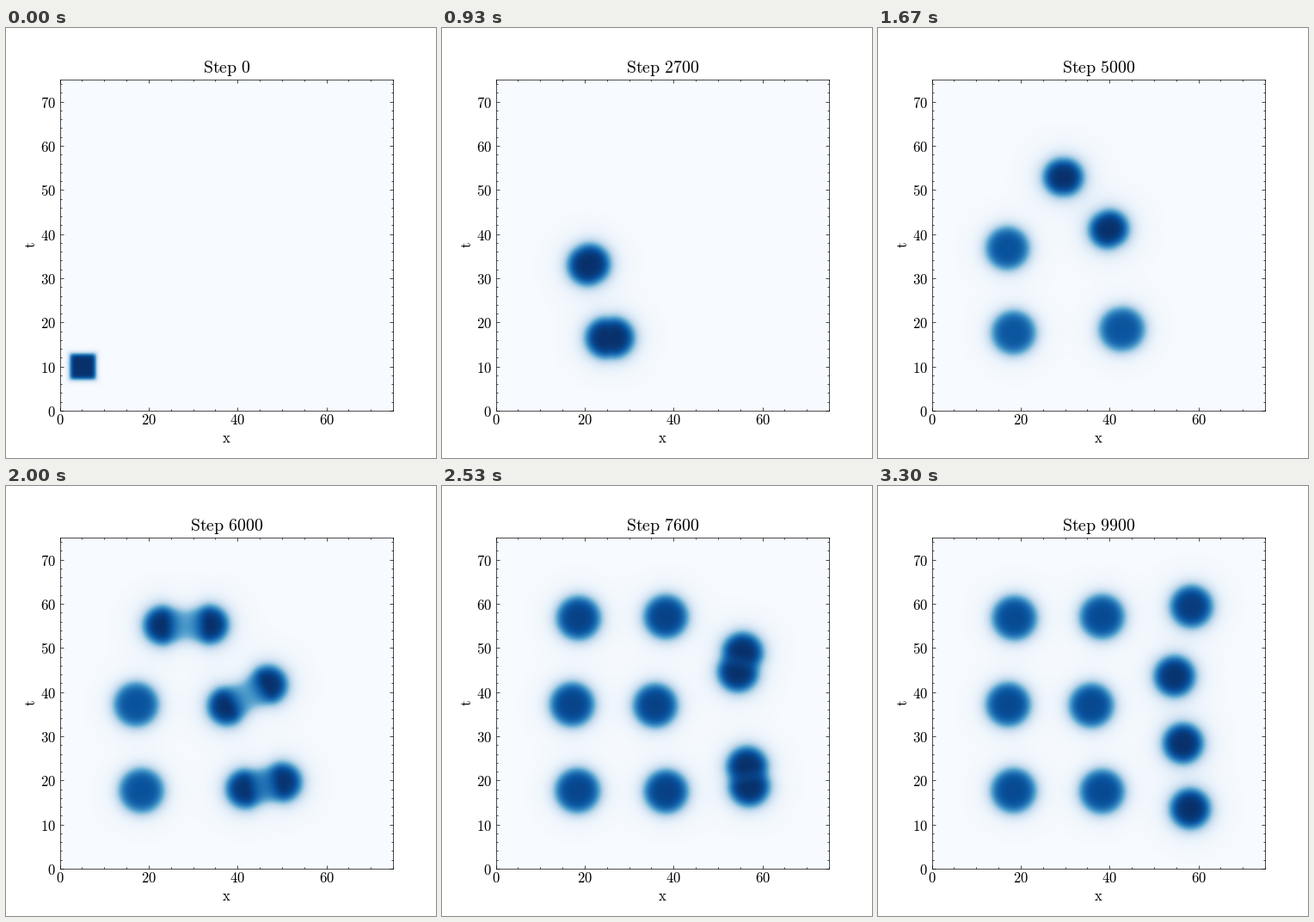
A matplotlib script that plays this animation: 500x500 px, repeating every 3.33 s.

```python
import numpy as np
import matplotlib.pyplot as plt
from matplotlib.animation import FuncAnimation
from matplotlib.ticker import FuncFormatter, MultipleLocator

SIZE = 75
FRAMES = 100
STEPS_PER_FRAME = 100
REACH = 7.8      # half length of a spot at the moment it divides
SETTLE = 1850    # steps a spot needs to come to rest

plt.rcParams["mathtext.fontset"] = "cm"

axis = (np.arange(225) + 0.5) * SIZE / 225
GRID = axis[None, :] + 1j * axis[:, None]

# Family tree, points as x + yj: a spot rests at a point, or divides there
# at a given step into two further spots.
upper_right = (55.9 + 47.5j, 8200, (58.3 + 59.4j,), (54.5 + 43.6j,))
lower_right = (57.2 + 21j, 8200, (56.4 + 28.4j,), (58 + 13.6j,))
top = (28.2 + 55.4j, 6250, (38.2 + 57.1j,), (18.5 + 56.8j,))
middle = (42.3 + 39.1j, 6250, upper_right, (35.8 + 37j,))
bottom = (46.2 + 18.9j, 6350, lower_right, (38.2 + 17.5j,))
inner = (34.6 + 47j, 5000, top, middle)
upper = (22.2 + 36.9j, 4000, inner, (17.1 + 37.2j,))
lower = (27.4 + 17.2j, 3600, bottom, (18.3 + 17.7j,))
root = (22.1 + 23.5j, 2300, upper, lower)


def grow(node, birth, start):
    """Flatten the tree; daughters begin at the tips of their parent."""
    home, *fate = node
    cell = dict(birth=birth, start=start, home=home, end=np.inf, axis=1)
    if not fate:
        return [cell]
    end, a, b = fate
    direction = (a[0] - b[0]) / abs(a[0] - b[0])
    cell.update(end=end, axis=direction)
    tip = REACH * direction
    return [cell] + grow(a, end, home + tip) + grow(b, end, home - tip)


cells = grow(root, 0, 5.1 + 10j)


def mix(a, b, k):
    return a + (b - a) * k


def position(cell, step):
    age = step - cell["birth"]
    if np.isinf(cell["end"]):
        ease = 1 - (1 - min(age / SETTLE, 1)) ** 3
    else:
        ease = 1 - (1 - age / (cell["end"] - cell["birth"])) ** 1.6
    return mix(cell["start"], cell["home"], ease)


def spot(cell, pos, nearest, step):
    """A capsule that stretches, thins at the waist and parts."""
    grown = min(step / 300, 1)
    stretch = np.exp(-((cell["end"] - step) / 500) ** 1.3)
    half = max(REACH * stretch, 1e-3)

    # Young, stretched and crowded spots are smaller and darker.
    young = np.exp(-(step - cell["birth"]) / 700)
    crowd = 1 / (1 + (nearest / 15.5) ** 12)
    stress = max(young, np.sqrt(stretch), crowd)

    direction = mix(1j, cell["axis"], grown)
    local = (GRID - pos) * np.conj(direction) / abs(direction)
    s = np.clip(local.real / half, -1, 1)
    power = mix(8, 2, grown)
    r = (np.abs(local.real - s * half) ** power
         + np.abs(local.imag) ** power) ** (1 / power)

    waist = stretch ** 2.3 * (1 - s * s) ** 2
    radius = mix(2.95, 5.05 - 0.9 * stress, grown) * (1 - 0.5 * waist)
    edge = np.clip((r - radius) / mix(0.28, 0.76, grown), -40, 40)
    core = 1 / (1 + np.exp(edge))
    halo = 0.16 * grown * np.exp(-(r / 6.5) ** 2)
    return (1 + 0.2 * stress) * (1 - waist) * (core + halo * (1 - core))


def field(step):
    alive = [c for c in cells if c["birth"] <= step < c["end"]]
    spots = [position(c, step) for c in alive]
    total = 0
    for cell, pos in zip(alive, spots):
        nearest = min((abs(pos - q) for q in spots if q != pos), default=SIZE)
        total = total + spot(cell, pos, nearest, step)
    return total / total.max()


def roman(text):
    return r"$\mathrm{%s}$" % text.replace(" ", r"\ ")


fig, ax = plt.subplots(figsize=(5, 5), dpi=100)
image = ax.imshow(field(0), cmap="Blues", vmin=0, vmax=1, origin="lower",
                  extent=(0, SIZE, 0, SIZE), aspect="auto",
                  interpolation="bilinear")
title = ax.set_title(roman("Step 0"), fontsize=14.3)
fig.text(0.512, 0.047, roman("x"), fontsize=12, ha="center", va="center")
fig.text(0.058, 0.496, roman("t"), fontsize=12, ha="center", va="center",
         rotation=90)

for side, major, minor in ((ax.xaxis, 20, 5), (ax.yaxis, 10, 2)):
    side.set_major_locator(MultipleLocator(major))
    side.set_minor_locator(MultipleLocator(minor))
    side.set_major_formatter(FuncFormatter(lambda v, _: roman(f"{v:.0f}")))
ax.tick_params(which="both", direction="in", top=True, right=True, width=0.5)
ax.tick_params(which="major", length=3, labelsize=12)
ax.tick_params(which="minor", length=1.5)
ax.tick_params(axis="x", pad=1.6)
for spine in ax.spines.values():
    spine.set_linewidth(0.5)


def draw(frame):
    step = frame * STEPS_PER_FRAME
    image.set_data(field(step))
    title.set_text(roman(f"Step {step}"))
    return image, title


anim = FuncAnimation(fig, draw, frames=FRAMES, interval=33.3, repeat=True,
                     repeat_delay=0, blit=False)
plt.show()
```
